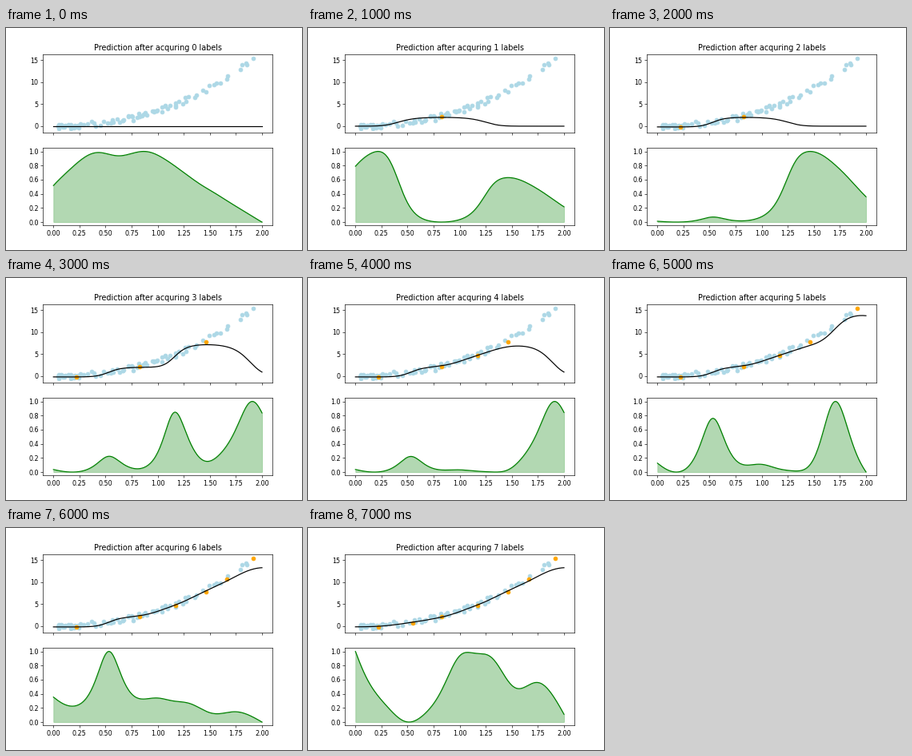
A matplotlib script that plays this animation: 370x278 px, repeating every 8 s.

```python
import numpy as np
import matplotlib.pyplot as plt
from matplotlib.animation import FuncAnimation

# Kernel regressor with a normal-inverse-chi-squared prior
GAMMA, KAPPA, NU = 15.0, 0.1, 2.5
DAMPING = 0.15  # how far output change is weighed down by local variance

# Labels in the order they are acquired
LABELS = np.array([(0.83, 2.2), (0.217, -0.2), (1.464, 7.9), (1.168, 4.8),
                   (1.914, 15.4), (1.663, 10.8), (0.547, 0.8)])

# Unlabelled pool: dense on the left, thinning out to the right
rng = np.random.default_rng(4)
pool_x = np.interp(np.arange(77), [0, 18, 27, 56, 64, 72, 73, 76],
                   [0.03, 0.25, 0.55, 1.1, 1.3, 1.66, 1.79, 1.87])
pool_x += rng.uniform(-0.02, 0.02, pool_x.size)
pool_y = pool_x ** 3 + 2 * pool_x ** 2 + pool_x / 2
pool_y += rng.uniform(-0.7, 0.7, pool_x.size)

EVAL_X = np.concatenate([pool_x, LABELS[:, 0]])
GRID = np.linspace(0, 2, 201)


def kernel(a, b):
    return np.exp(-GAMMA * (a[:, None] - b) ** 2)


def predict(x, xs, ys):
    """Posterior mean, variance and evidence at x, given labelled points."""
    k = kernel(x, xs)
    n = k.sum(axis=1)
    kappa = KAPPA + n
    mean = k @ ys / kappa
    spread = NU + k @ ys ** 2 - kappa * mean ** 2
    var = (1 + kappa) / kappa * spread / (NU + n - 2)
    return mean, var, kappa


def utility(xs, ys):
    """Expected squared change of the outputs per grid point, scaled to 0..1."""
    mean, var, _ = predict(GRID, xs, ys)
    eval_mean, eval_var, kappa = predict(EVAL_X, xs, ys)
    k = kernel(GRID, EVAL_X)
    error = var[:, None] + (mean[:, None] - eval_mean) ** 2
    change = (k / (kappa + k)) ** 2 * error
    gain = (change / eval_var ** DAMPING).sum(axis=1)
    return (gain - gain.min()) / np.ptp(gain)


fig, (top, low) = plt.subplots(2, 1, sharex=True, figsize=(6.4, 4.809),
                               dpi=57.8125)


def draw(step):
    xs, ys = LABELS[:step].T
    mean = predict(GRID, xs, ys)[0]
    gain = utility(xs, ys)
    for ax in (top, low):
        ax.clear()
    top.set_title(f"Prediction after acquring {step} labels", pad=7)
    top.scatter(pool_x, pool_y, color="lightblue")
    top.scatter(*LABELS[step:].T, color="lightblue")
    top.scatter(xs, ys, color="orange")
    top.plot(GRID, mean, color="black")
    low.plot(GRID, gain, color="green")
    low.fill_between(GRID, gain, color="green", alpha=0.3)
    top.set(xlim=(-0.1, 2.1), ylim=(-1.4, 16.3))
    low.set_ylim(-0.05, 1.05)
    top.tick_params(labelbottom=False)


anim = FuncAnimation(fig, draw, frames=8, interval=1000, repeat=True,
                     repeat_delay=0, init_func=lambda: None)
plt.show()
```
